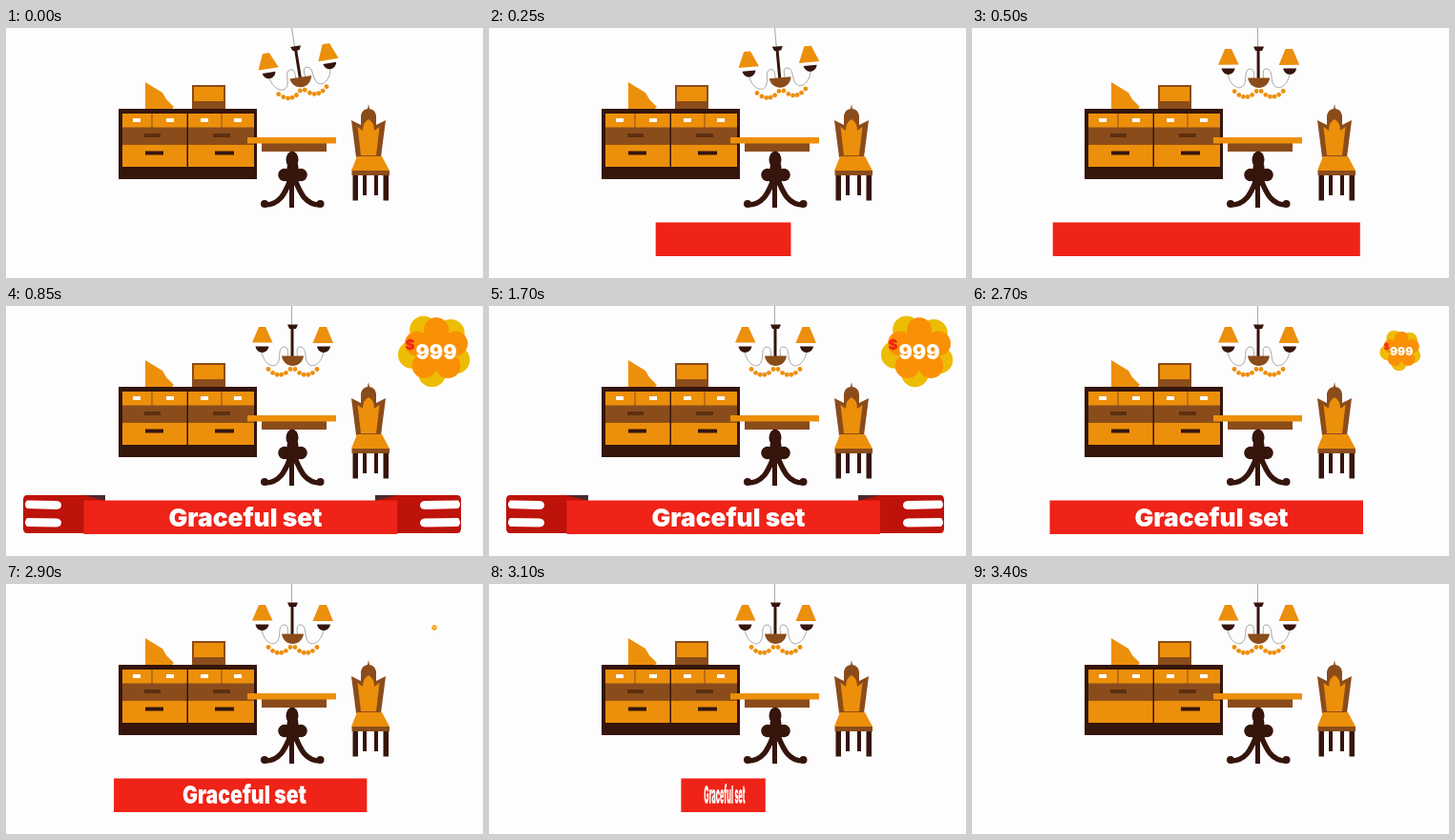
An HTML page that plays this animation: 500 by 263 pixels, repeating every 3450 ms.

```html
<!DOCTYPE html>
<html lang="en">
<head>
<meta charset="utf-8">
<title>Furniture set</title>
<style>
  html, body { margin: 0; width: 100%; height: 100%; overflow: hidden; background: #fefdfe; }
  svg { display: block; width: 100%; height: 100%; }
  text { font-family: Inter, "Open Sans", sans-serif; font-weight: 900; }
  .o { fill: #ec8f0b; }
  .b { fill: #8a4c1b; }
  .d { fill: #35150c; }
  .w { fill: #fff; }
  .r { fill: #ef2318; }
  .wire { fill: none; stroke: #9da09c; stroke-width: .9; }
</style>
</head>
<body>
<svg viewBox="0 0 500 263">
  <!-- chest of drawers -->
  <path class="o" d="M146 57L164 68L168 75L176 83L174 85H146Z"/>
  <path class="b" d="M195 60H230V85H195Z"/>
  <path class="o" d="M197 62H228V77H197Z"/>
  <path class="d" d="M118 85H263V159H118Z"/>
  <path class="b" d="M122 90H189.500V122H122ZM191 90H260V122H191Z"/>
  <path class="o" d="M122 90H152.500V104.500H122ZM153.500 90H189.500V104.500H153.500ZM191 90H225.500V104.500H191ZM226.500 90H260V104.500H226.500ZM122 122.500H189.500V146H122ZM191 122.500H260V146H191Z"/>
  <path class="w" d="M133 95H141V99H133ZM168 95H176V99H168ZM204 95H212V99H204ZM239 95H247V99H239Z"/>
  <path fill="#5c2f10" d="M145 111H162V115H145ZM217 111H235V115H217Z"/>
  <path class="d" d="M219 129.500H239V133.500H219Z"/>
  <path class="d" id="handle" d="M146 129.500H165V133.500H146Z"/>

  <!-- table -->
  <path class="b" d="M268 121H336V130H268Z"/>
  <path class="o" d="M253 115H346V121.500H253Z"/>
  <g class="d">
    <ellipse cx="300" cy="138.500" rx="6.500" ry="9"/>
    <circle cx="292" cy="154.500" r="6.800"/>
    <circle cx="309" cy="154.500" r="6.800"/>
    <path d="M295 143H306L308 160L302 166V189H297V166L293 160Z"/>
    <circle cx="271" cy="185" r="4"/>
    <circle cx="329.500" cy="185" r="4"/>
    <path fill="none" stroke="#35150c" stroke-width="5.500" d="M298 160C293 172 288 186 271 186M303 160C308 172 313 186 329.500 186"/>
  </g>

  <!-- chair -->
  <path class="b" d="M362 97L372 102V92Q373 86 379 85L380 80L381 85Q387 86 388 92V102L398 97L393 136H367Z"/>
  <path class="o" d="M368.500 104L374 108Q374 99 380 96Q386 99 386 108L391.500 104L388 134H372Z"/>
  <path class="d" d="M374 155H378V176H374ZM386 155H390V176H386ZM363.500 155H369V181.500H363.500ZM395.500 155H401V181.500H395.500Z"/>
  <path class="o" d="M368 135H394L402 150H362Z"/>
  <path class="b" d="M362.500 150H402V155H362.500Z"/>

  <g id="lamp">
    <path class="wire" d="M299.500 -5V20M268 48C270 60 279 66 284 61S284 44 291 43S294 54 296 56M333 48C331 60 322 66 317 61S316 44 309 43S307 54 305 56"/>
    <path class="d" d="M295 19.500H306L304 24H301.500V53H298.500V24H297Z"/>
    <path class="b" d="M289 52.500H312C311 59 306 63 300.500 63S290 59 289 52.500Z"/>
    <path class="o" d="M265 22H272L279.500 38.500H258ZM328.500 22H336L343 39H321.500Z"/>
    <path class="d" d="M261.500 42.500H275.500C274 51 263 51 261.500 42.500ZM326 42.500H340C338.500 51 327.500 51 326 42.500Z"/>
    <g id="beads" class="o"></g>
  </g>

  <!-- ribbon -->
  <g id="tailL">
    <path fill="#bd130a" d="M22 199H104V239H22Q18 239 18 234V204Q18 199 22 199Z"/>
    <path class="w" d="M22 204.500L53 205Q58 205.500 58 209.500T53 214L22 213Q18 209 22 204.500ZM22 223L53 223.500Q58 224 58 228T53 232.500L22 232Q18 227.500 22 223Z"/>
    <path fill="#4a2a2c" d="M82 199H104V205Z"/>
  </g>
  <g id="tailR">
    <path fill="#bd130a" d="M473 199H387V239H473Q477 239 477 234V204Q477 199 473 199Z"/>
    <path class="w" d="M474 204.500L439 205Q434 205.500 434 209.500T439 214L474 213Q478 209 474 204.500ZM474 223L439 223.500Q434 224 434 228T439 232.500L474 232Q478 227.500 474 223Z"/>
    <path fill="#4a2a2c" d="M409 199H387V205Z"/>
  </g>
  <g id="banner">
    <path class="r" d="M81.500 204.500H410V240H81.500Z"/>
    <g id="title"><text class="w" x="251" y="231.500" font-size="26.300" text-anchor="middle">Graceful set</text></g>
  </g>

  <g id="price">
    <g id="petals" fill="#edbd04"></g>
    <g id="bloom" fill="#fa9005"></g>
    <text class="r" x="418.500" y="45.500" font-size="15">$</text>
    <text class="w" x="429.500" y="56" font-size="21.300">999</text>
  </g>
</svg>
<script>
const LOOP = 3450;
const el = id => document.getElementById(id);
const dot = (x, y, r) => `<circle cx="${x}" cy="${y}" r="${r}"/>`;

// two hanging strings of beads
let beads = "";
for (const x0 of [275, 303]) {
  for (let i = 0; i < 6; i++) {
    const u = i / 2.5 - 1;
    beads += dot(x0 + i * 4.6, 72.5 - 6 * u * u, 2.4);
  }
}
el("beads").innerHTML = beads;

// five round lobes around a disc
function flower(id, x, y, ring, r, turn) {
  let lobes = dot(x, y, ring);
  for (let i = 0; i < 5; i++) {
    const a = (turn + i * 72) * Math.PI / 180;
    lobes += dot(x + ring * Math.cos(a), y + ring * Math.sin(a), r);
  }
  el(id).innerHTML = lobes;
}
flower("petals", 449.5, 46.5, 24.5, 14.5, 97);
flower("bloom", 451, 46, 21, 13, -90);

function ease(t, from, to) {
  const p = Math.min(1, Math.max(0, (t - from) / (to - from)));
  return (1 - Math.cos(Math.PI * p)) / 2;
}
// grows over a..b, shrinks over c..d
const inOut = (t, a, b, c, d) => ease(t, a, b) - ease(t, c, d);

function scale(id, x, y, sx, sy) {
  const node = el(id);
  node.setAttribute("visibility", sx > 0.002 && sy > 0.002 ? "visible" : "hidden");
  node.setAttribute("transform", `translate(${x} ${y}) scale(${sx} ${sy}) translate(${-x} ${-y})`);
}

function draw(t) {
  el("lamp").setAttribute("transform", `rotate(${-9 * (1 - ease(t, 0, 550))} 300 0)`);
  el("handle").setAttribute("visibility", t < 3400 ? "visible" : "hidden");

  scale("banner", 245.5, 222, inOut(t, 0, 550, 2742, 3292), 1);
  const word = ease(t, 550, 830);
  scale("title", 251, 222, word, word);

  const tail = inOut(t, 550, 830, 2370, 2660);
  scale("tailL", 104, 222, tail, 1);
  scale("tailR", 387, 222, tail, 1);

  const pop = inOut(t, 550, 830, 2450, 3000);
  scale("price", 449, 46, pop, pop);
}

const start = performance.now();
function tick(now) {
  draw(Math.max(0, now - start) % LOOP);
  requestAnimationFrame(tick);
}
draw(0);
requestAnimationFrame(tick);
</script>
</body>
</html>
```
